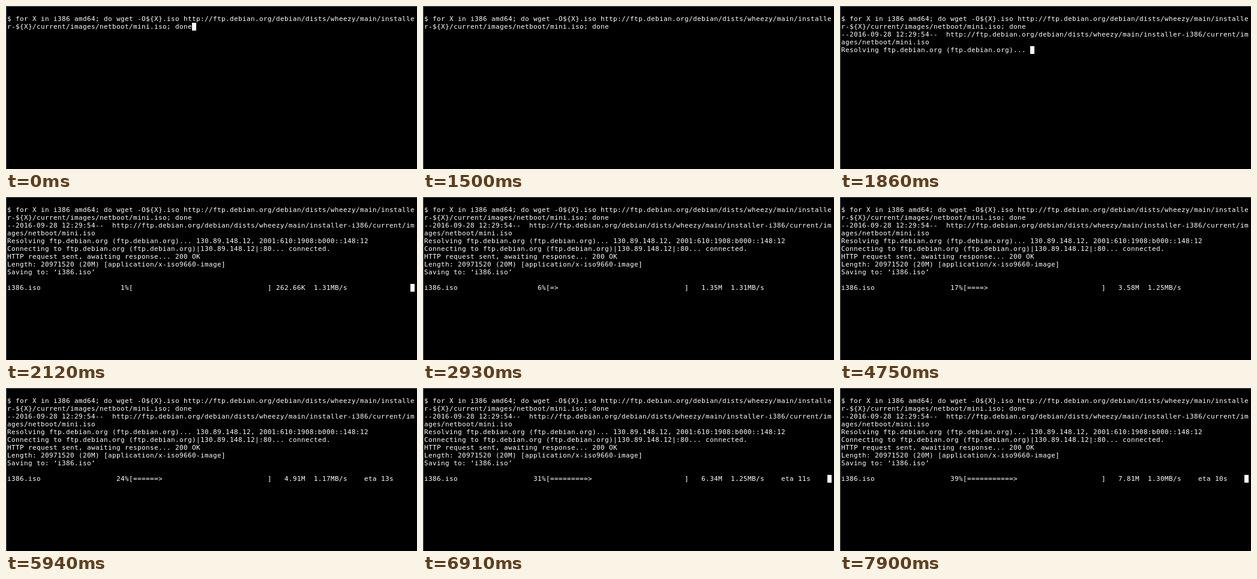
Animation, 685 px wide and 272 px high, one loop 8 s. Source, as an HTML page:

```html
<!DOCTYPE html>
<html lang="en">
<head>
<meta charset="utf-8">
<title>Terminal download</title>
<style>
  html, body { margin: 0; width: 100%; height: 100%; overflow: hidden; background: #000; }
  svg { display: block; }
  text { font: 11px "DejaVu Sans Mono", monospace; fill: #fff; white-space: pre; }
</style>
</head>
<body>
<svg id="term" width="685" height="272" viewBox="0 0 685 272">
  <rect width="685" height="272" fill="#000"/>
  <path d="M0 .5H685M.5 0V272" stroke="#465c6c" fill="none"/>
  <rect id="cursor" width="7" height="13" fill="#fff"/>
</svg>
<script>
const LOOP = 8000, CELL_W = 7, CELL_H = 13, LEFT = 2, TOP = 15, BASELINE = 10;
const TOTAL = 20, BAR = 32, LAST_COL = 96;

const intro = [
  "$ for X in i386 amd64; do wget -O${X}.iso http://ftp.debian.org/debian/dists/wheezy/main/installe",
  "r-${X}/current/images/netboot/mini.iso; done"
];
const request = [
  "--2016-09-28 12:29:54--  http://ftp.debian.org/debian/dists/wheezy/main/installer-i386/current/im",
  "ages/netboot/mini.iso"
];
const resolving = "Resolving ftp.debian.org (ftp.debian.org)... ";
const resolved = resolving + "130.89.148.12, 2001:610:1908:b000::148:12";
const connecting = "Connecting to ftp.debian.org (ftp.debian.org)|130.89.148.12|:80... ";
const response = [
  connecting + "connected.",
  "HTTP request sent, awaiting response... 200 OK",
  "Length: 20971520 (20M) [application/x-iso9660-image]",
  "Saving to: \u2018i386.iso\u2019",
  ""
];

// Moments at which the progress line is rewritten
const ticks = [
  1930, 2120, 2320, 2520, 2720, 2930, 3120, 3320, 3520, 3710, 3920,
  4110, 4310, 4510, 4710, 4910, 5110, 5320, 5520, 5720, 5940, 6120,
  6320, 6490, 6710, 6910, 7080, 7310, 7510, 7660, 7900
];
const sizeKeys = [[1930, 0], [2930, 1.35], [4710, 3.58], [5940, 4.91], [6910, 6.34], [7900, 7.81]];
const speedKeys = [[1930, 1.31], [2930, 1.31], [4710, 1.25], [5940, 1.17], [6910, 1.25], [7900, 1.30]];
const etaKeys = [[5110, 13], [6120, 11], [7310, 10]];

function lerpKeys(keys, t) {
  let i = 1;
  while (i < keys.length - 1 && keys[i][0] < t) i++;
  const [t0, a] = keys[i - 1], [t1, b] = keys[i];
  return a + (b - a) * (t - t0) / (t1 - t0);
}

function progressLine(t) {
  const tick = ticks.filter(k => k <= t).pop();
  const size = lerpKeys(sizeKeys, tick);
  const done = size / TOTAL;
  const filled = Math.floor(done * BAR);
  const bar = filled ? "=".repeat(filled - 1) + ">" : "";
  const amount = !size ? "0" : size < 1 ? (size * 1024).toFixed(2) + "K" : size.toFixed(2) + "M";
  const speed = size ? lerpKeys(speedKeys, tick).toFixed(2) + "MB/s" : "--.-KB/s";
  const eta = etaKeys.filter(k => k[0] <= tick).pop();
  const line = "i386.iso".padEnd(25) + String(Math.floor(done * 100)).padStart(3) + "%[" +
    bar.padEnd(BAR) + "]" + amount.padStart(8) + "  " + speed;
  return (eta ? line.padEnd(85) + "eta " + eta[1] + "s" : line).padEnd(LAST_COL);
}

function screenAt(t) {
  if (t < 1780) return intro;
  if (t < 1860) return [...intro, ""];
  if (t < 1900) return [...intro, ...request, resolving];
  if (t < 1930) return [...intro, ...request, resolved, connecting];
  return [...intro, ...request, resolved, ...response, progressLine(t)];
}

// The blink restarts when the command is entered
function cursorOn(t) {
  const phase = t < 1780 ? (t + 300) / 600 : (t - 1780) / 594;
  return Math.floor(phase) % 2 === 0;
}

const svg = document.getElementById("term");
const cursor = document.getElementById("cursor");
const columns = Array.from({ length: LAST_COL + 1 }, (_, i) => LEFT + i * CELL_W).join(" ");
const rows = Array.from({ length: 11 }, (_, i) => {
  const row = document.createElementNS("http://www.w3.org/2000/svg", "text");
  row.setAttribute("x", columns);
  row.setAttribute("y", TOP + i * CELL_H + BASELINE);
  return svg.appendChild(row);
});

function draw(t) {
  const lines = screenAt(t);
  rows.forEach((row, i) => {
    const line = lines[i] || "";
    if (row.textContent !== line) row.textContent = line;
  });
  const last = lines.length - 1;
  cursor.setAttribute("x", LEFT + lines[last].length * CELL_W);
  cursor.setAttribute("y", TOP + last * CELL_H);
  cursor.setAttribute("visibility", cursorOn(t) ? "visible" : "hidden");
}

const start = performance.now();
function frame() {
  draw((performance.now() - start) % LOOP);
  requestAnimationFrame(frame);
}
frame();
</script>
</body>
</html>
```
